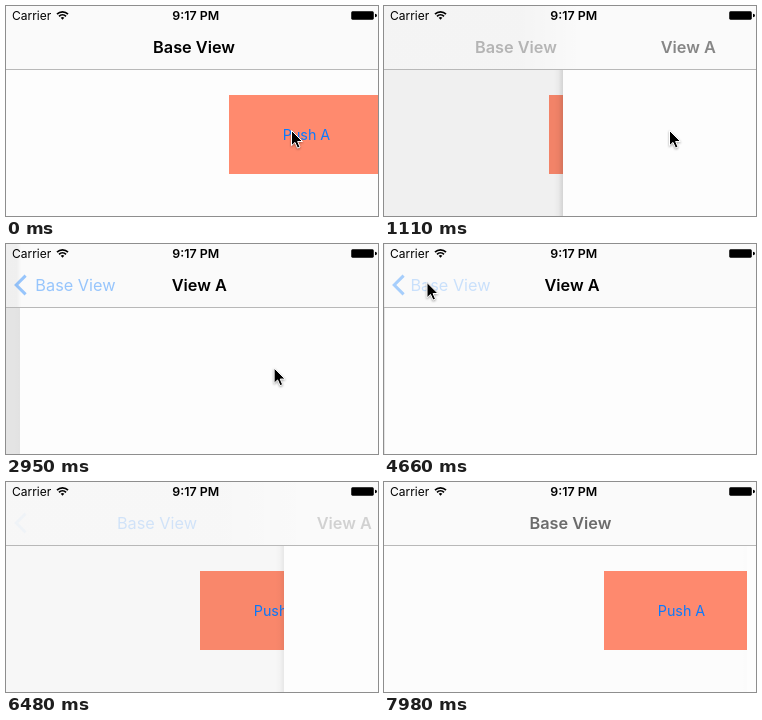
These frames come from a looping animation (372x210 px, 8 s). An HTML page:

```html
<!DOCTYPE html>
<html lang="en">
<head>
<meta charset="utf-8">
<title>Navigation push and pop</title>
<style>
  html, body { margin: 0; width: 100%; height: 100%; overflow: hidden; background: #fdfdfd; }
  svg { display: block; width: 100%; height: 100%; }
  text { font-family: Inter, "Liberation Sans", sans-serif; font-size: 16.3px; }
  .bold { font-weight: 600; }
  .mid { text-anchor: middle; }
  .small { font-size: 12px; }
  .clock { font-size: 12.4px; }
  .blue { fill: #0a7aff; }
  #cursor { filter: drop-shadow(0 1px 1px rgba(0, 0, 0, .35)); }
</style>
</head>
<body>
<svg viewBox="0 0 372 210">
  <defs>
    <linearGradient id="shade">
      <stop offset="0" stop-opacity="0"/>
      <stop offset=".5" stop-opacity=".06"/>
      <stop offset="1" stop-opacity=".25"/>
    </linearGradient>
    <linearGradient id="fade">
      <stop offset=".7"/>
      <stop offset="1" stop-opacity="0"/>
    </linearGradient>
  </defs>

  <rect width="372" height="210" fill="#fdfdfd"/>
  <g id="base">
    <rect x="223" y="89" width="155" height="79" fill="#ff8a6e"/>
    <text class="mid blue" x="300.5" y="134" style="font-size:14.3px">Push A</text>
  </g>
  <rect id="dim" width="372" height="210"/>
  <g id="page">
    <rect id="shadow" x="-9" width="9" height="210" fill="url(#shade)"/>
    <rect width="372" height="210" fill="#fdfdfd"/>
  </g>

  <rect width="372" height="64" fill="#fafafa"/>
  <rect id="navDim" height="63" fill="url(#fade)"/>
  <rect y="63" width="372" height="1" fill="#b8b8b8"/>

  <path id="chevron" d="M19.6 31.6 10.2 41l9.4 9.4" fill="none" stroke="#0a7aff" stroke-width="3"/>
  <text id="title" class="mid bold" y="47">Base View</text>
  <text id="label" class="mid blue" y="47">Base View</text>
  <text id="titleA" class="mid bold" y="47">View A</text>

  <text class="small" x="6" y="14">Carrier</text>
  <text class="clock mid bold" x="189.7" y="14">9:17 PM</text>
  <g fill="none" stroke="#000" stroke-width="1.7">
    <path d="M51 8.1a7.8 7.8 0 0 1 11 0M53 10.3a5 5 0 0 1 7 0"/>
    <path d="M56.5 13.7 54.7 11.8a2.6 2.6 0 0 1 3.6 0z" fill="#000" stroke="none"/>
  </g>
  <rect x="345.5" y="5.5" width="22" height="8" rx="1.2" stroke="#000" stroke-opacity=".55"/>
  <path d="M369 7.7q2 .3 2 1.8t-2 1.8z"/>

  <path id="cursor" d="M0 0V15.2L3.5 11.9 6 17.6 8.5 16.5 6.1 11H11z" stroke="#fff" stroke-width="1"/>
</svg>
<script>
const LOOP = 8000, WIDTH = 372;
const PUSH = 150, PUSH_TIME = 3500;
const PRESS = 4660;
const POP = 5098, POP_TIME = 3380;
const el = id => document.getElementById(id);
const [base, dim, page, shadow, navDim, chevron, title, label, titleA, cursor] =
  ["base", "dim", "page", "shadow", "navDim", "chevron", "title", "label", "titleA", "cursor"].map(el);
const clamp = v => Math.min(1, Math.max(0, v));
const move = (node, x, y = 0) => node.setAttribute("transform", `translate(${x} ${y})`);
const alpha = (node, v) => node.setAttribute("opacity", clamp(v));

// Critically damped spring: 1 at rest, falling to 0.
function spring(ms, rate) {
  const k = rate * Math.max(0, ms) / 1000;
  return (1 + k) * Math.exp(-k);
}

// cubic-bezier(.25, .1, .25, 1)
function ease(x) {
  let lo = 0, hi = 1;
  for (let i = 0; i < 24; i++) {
    const s = (lo + hi) / 2;
    if (.75 * s * (1 - s) + s ** 3 < x) lo = s; else hi = s;
  }
  const s = (lo + hi) / 2;
  return .3 * s * (1 - s) ** 2 + 3 * s * s * (1 - s) + s ** 3;
}

function drawPage(t, popping) {
  const left = popping ? 1 - spring(t - POP - 27, 1.97) : spring(t - PUSH - 8, 1.8257);
  const edge = Math.round(WIDTH * left), cover = 1 - left;
  move(base, Math.floor(-.3 * (WIDTH - edge)));
  move(page, edge);
  dim.setAttribute("opacity", .1 * cover);
  alpha(shadow, popping ? cover : Math.min(left, 8 * cover));
  navDim.setAttribute("width", edge * 1.1);
  navDim.setAttribute("opacity", .045 * cover);
}

function drawNav(t, popping) {
  const x = clamp(popping ? (t - POP) / POP_TIME : (t - PUSH) / PUSH_TIME);
  const p = popping ? 1 - ease(x) : ease(x);
  const center = 188 - 121.5 * p;
  const late = (x - .66) / .34;
  const out = .81 - 1.6 * x;
  const pressed = t >= PRESS;
  move(title, center);
  move(label, center);
  move(titleA, 188 + 216 * (1 - p));
  alpha(title, popping ? late : 1 - 2.7 * x);
  alpha(label, popping ? out : pressed ? .2 : late);
  alpha(titleA, popping ? out : x / .6);
  alpha(chevron, popping ? .22 * (1 - 2.1 * x) : pressed ? .35 : late);
}

function drawCursor(t) {
  const u = clamp((t - 2820) / 800), p = u * u * (3 - 2 * u);
  move(cursor, 285.5 - 242.5 * p, 124.5 - 86 * p * p);
  alpha(cursor, t < POP ? 1 : 0);
}

const start = performance.now();
function frame(now) {
  const t = Math.max(0, now - start) % LOOP, popping = t >= POP;
  drawPage(t, popping);
  drawNav(t, popping);
  drawCursor(t);
  requestAnimationFrame(frame);
}
frame(start);
</script>
</body>
</html>
```
